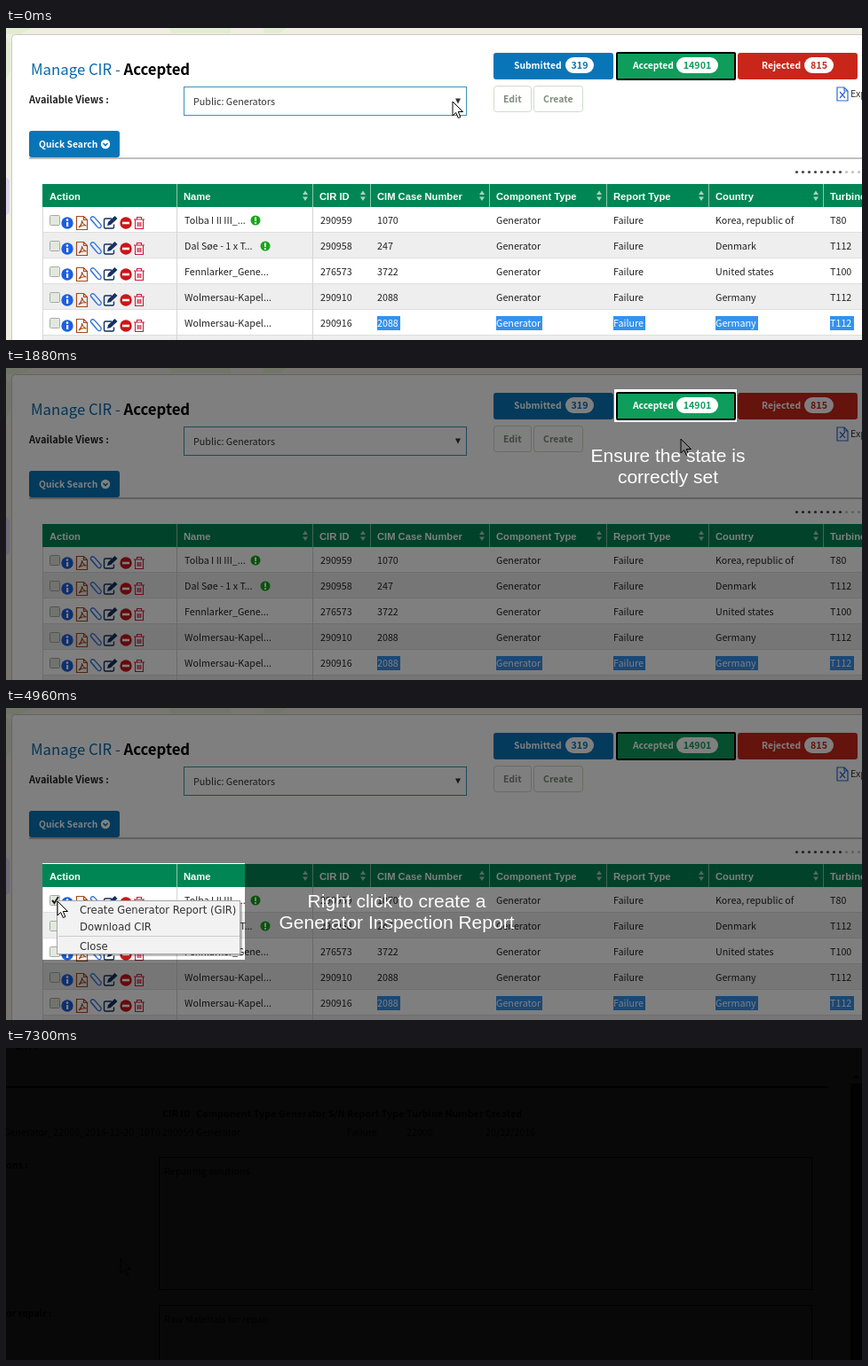
An HTML page that plays this animation: 964x352 px, repeating every 7330 ms.

```html
<!DOCTYPE html>
<html lang="en">
<head>
<meta charset="utf-8">
<title>Report list walkthrough</title>
<style>
html, body { margin: 0; width: 100%; height: 100%; overflow: hidden; background: #000; }
svg { display: block; width: 100vw; height: 100vh; }
text { white-space: pre; font: 10.74px 'Noto Sans CJK SC', 'Noto Sans CJK JP', 'Noto Sans CJK', 'Open Sans', sans-serif; }
.b { font-weight: bold; }
.head { font: bold 11.2px 'Liberation Sans', sans-serif; fill: #fff; }
.menu { font: 11.6px 'DejaVu Sans', sans-serif; fill: #333; }
.hint { font: 21px 'Liberation Sans', sans-serif; fill: #fff; text-anchor: middle; }
</style>
</head>
<body>
<svg id="stage" viewBox="0 0 964 352"></svg>
<script>
const LOOP = 7330, DIM = 0.5;

const rect = (x, y, w, h, fill, more = '') => `<rect x="${x}" y="${y}" width="${w}" height="${h}" fill="${fill}" ${more}/>`;
const text = (x, y, s, more = '') => `<text x="${x}" y="${y}" ${more}>${s}</text>`;
const line = (d, color, w = 1, more = '') => `<path d="${d}" fill="none" stroke="${color}" stroke-width="${w}" ${more}/>`;
const shape = (d, fill, more = '') => `<path d="${d}" fill="${fill}" ${more}/>`;
const disc = (x, y, r, fill) => `<circle cx="${x}" cy="${y}" r="${r}" fill="${fill}"/>`;
const group = (id, body, more = '') => `<g id="${id}" ${more}>${body}</g>`;

function stateButton(x, label, labelX, count, pillX, pillW, color) {
  const on = label === 'Accepted';
  const box = on
    ? rect(x + 1, 28, 133, 30, color, 'stroke="#000" stroke-width="2" rx="1"')
    : rect(x, 28, 135, 30, color, 'rx="3"');
  return box + text(labelX, 46, label, 'class="b" fill="#fff" style="font-size:10.3px"') +
    rect(pillX, 33, pillW, 18, '#fff', 'rx="9"') +
    text(pillX + pillW / 2, 46, count, `class="b" fill="${color}" text-anchor="middle"`);
}

function smallButton(x, w, label) {
  return rect(x + .5, 65.5, w, 29, '#fff', 'rx="3" stroke="#cfdccb"') +
    text(x + 11, 84, label, 'class="b" fill="#7f8c7c" style="font-size:10.5px"');
}

function docIcon(x, y, color, mark) {
  return line(`M${x} ${y}h8l4 4v11h-12zM${x + 8} ${y}v4h4`, color, 1.2) + line(mark, color, 1.2);
}

function rowIcons(y) {
  return rect(49.5, y - 8.5, 11, 11, '#e3e8df', 'stroke="#a3ada0" rx="1"') +
    disc(69, y, 6.7, '#1c5fe0') + rect(68, y - 1, 2.2, 5, '#fff') + disc(69, y - 3.4, 1.3, '#fff') +
    docIcon(79.5, y - 7.5, '#a8481c', `M82 ${y + 5}q4-4 3.5-8q1 5 5 6q-5-1-8.500 2`) +
    line(`M96 ${y - 4}l7 8.500q2 2 3.500 .5t0-3.500l-7-8q-2-1.500-3.500 0t0 3l6 7`, '#3c78dc', 1.3) +
    line(`M119 ${y - 5}h-7q-1.500 0-1.500 1.500v8q0 1.500 1.500 1.500h8q1.500 0 1.500-1.500v-3`, '#15315f', 1.4) +
    shape(`M114 ${y + 3}l1-4l7.500-7l3 3l-7.500 7z`, '#15315f') +
    disc(135, y, 6.7, '#cc1518') + rect(131, y - 1.3, 8, 2.6, '#fff') +
    line(`M144 ${y - 4}h12M147.500 ${y - 4}v-2.500h5v2.500M145.500 ${y - 4}v10.500h9v-10.500M148.200 ${y - 1}v5M150 ${y - 1}v5M151.800 ${y - 1}v5`, '#cf1c3c', 1.1);
}

const alertMark = (x, y) => disc(x, y, 5.5, '#16a81a') + rect(x - 1, y - 3.5, 2, 4.5, '#fff') + rect(x - 1, y + 2, 2, 2, '#fff');

const columns = [['Action', 49], ['Name', 200], ['CIR ID', 353], ['CIM Case Number', 418],
  ['Component Type', 552], ['Report Type', 684], ['Country', 799], ['Turbine Type', 928]];
const rows = [
  ['Tolba I II III_...', '290959', '1070', 'Korea, republic of', 'T80'],
  ['Dal Søe - 1 x T...', '290958', '247', 'Denmark', 'T112'],
  ['Fennlarker_Gene...', '276573', '3722', 'United states', 'T100'],
  ['Wolmersau-Kapel...', '290910', '2088', 'Germany', 'T112'],
  ['Wolmersau-Kapel...', '290916', '2088', 'Germany', 'T112']];
const selection = [[418, 26], [552, 52], [684, 36], [799, 48], [928, 27]];

function table() {
  let s = rect(41, 176, 923, 26, '#008654');
  columns.forEach(([name, x]) => s += text(x, 194, name, 'class="head"'));
  [337, 402, 536, 668, 783, 912].forEach(x =>
    s += shape(`M${x - 3} 188l3-4.500l3 4.500zM${x - 3} 190.500l3 4.500l3-4.500z`, '#a9d3bd'));
  for (let i = 0; i < 6; i++) {
    const y = 202 + i * 29;
    s += rect(41, y, 923, 29, i % 2 ? '#eeeeee' : '#fff') + rect(41, y + 28, 923, 1, '#dedede');
  }
  s += line('M41.500 202V352', '#d8d8d8');
  [193, 346, 411, 545, 677, 792, 921].forEach(x =>
    s += rect(x - 1, 176, 1, 26, '#8cc7ab') + (x < 400 ? rect(x - 1, 202, 1, 150, '#d4d4d4') : ''));
  selection.forEach(([x, w]) => s += rect(x, 325, w, 16, '#3492ee'));
  rows.forEach(([name, id, num, country, turbine], i) => {
    const y = 221 + i * 29, cells = [num, 'Generator', 'Failure', country, turbine];
    s += rowIcons(y - 1) + text(201, y, name, 'fill="#222"') + text(354, y, id, 'fill="#222"');
    cells.forEach((c, k) => s += text(selection[k][0], y, c, `fill="${i === 4 ? '#fff' : '#222'}"`));
  });
  return s + alertMark(281, 217) + alertMark(292, 246);
}

function listPage() {
  let s = rect(0, 0, 964, 352, '#f0eee2') +
    shape('M0 0h30l-14 7h-16zM183 0h70v6h-66zM290 0h26l-8 6h-18z', '#e2ecd2') +
    shape('M0 168l4 4v36l-4 4z', '#dcd4ee') + shape('M0 10l5 8v30l-5 10z', '#e2ecd2') +
    rect(6.5, 7.5, 970, 360, '#fff', 'stroke="#cbc9c2" rx="4"');
  s += text(28, 53, 'Manage CIR - <tspan class="b" fill="#000">Accepted</tspan>', 'fill="#0868ab" style="font-size:16.75px"') +
    text(26, 85, 'Available Views :', 'class="b" fill="#222" style="font-size:11px"') +
    rect(200.5, 66.500, 318, 32, '#fff', 'stroke="#3e93b4"') + text(211, 87, 'Public: Generators', 'fill="#333"') +
    shape('M506 79.500h6l-3 6z', '#333');
  s += stateButton(549, 'Submitted', 572, '319', 630, 32, '#0875b8') +
    stateButton(687, 'Accepted', 706, '14901', 755, 47, '#0f9d5c') +
    stateButton(824, 'Rejected', 851, '815', 899, 33, '#c9261a');
  s += smallButton(549, 42, 'Edit') + smallButton(594, 55, 'Create') +
    docIcon(936, 67, '#2c68d8', 'M939 72l6 7M945 72l-6 7') + text(951, 78, 'Export', 'fill="#333"');
  s += rect(26, 146, 938, 2, '#bfbfbf') + rect(26, 116, 102, 30, '#0875b8', 'rx="3"') +
    text(37, 135, 'Quick Search', 'class="b" fill="#fff" style="font-size:10.3px"') + disc(112, 131, 5.2, '#fff') +
    line('M109.500 130l2.500 2.500l2.500-2.500', '#0875b8', 1.6);
  for (let i = 0; i < 11; i++) s += disc(890.5 + i * 7, 162.5, 1.6, i < 8 ? '#444' : '#c4c4c4');
  return s + table();
}

function menu() {
  return rect(60, 220, 206, 60, '#000', 'opacity=".25"') +
    rect(57.5, 217.5, 206, 60, '#f2f2f2', 'stroke="#a5a5a5"') +
    rect(59, 218, 204, 19, '#3d93e2', 'id="hover"') + rect(59, 257, 204, 1, '#cccccc') +
    text(83, 232, 'Create Generator Report (GIR)', 'class="menu"') +
    text(83, 251, 'Download CIR', 'class="menu"') + text(83, 273, 'Close', 'class="menu"');
}

const arrow = shape('M0 0V16L3.700 12.500L6.300 18.500L8.800 17.500L6.300 11.500H11.500Z', '#fff', 'stroke="#000"');
const hand = shape('M3 1.500q0-1.500 1.500-1.500t1.500 1.500v6q2-1 3 .5q2-.8 3 .7q3-.7 3 2.300v5q0 3-2 5v2h-8v-2l-5-7q-1-2 .5-2.500t2.500 2z', '#fff', 'stroke="#000"') +
  line('M6 8v5M9 8.500v4.500M12 9.500v3.500', '#000', .8);

function reportPage() {
  const bold = (x, s, y = 78) => text(x, y, s, 'class="b"');
  const area = (y, s) => rect(172.5, y + .5, 735, 149, '#fff', 'stroke="#000"') + text(178, y + 20, s);
  return rect(0, 0, 964, 352, '#fff') + bold(10, 'S/N :', 2) + rect(0, 43, 926, 2, '#000') +
    rect(951, 40, 13, 312, '#555') + shape('M954 34l3.500-4l3.500 4z', '#444') +
    bold(176, 'CIR ID') + bold(214, 'Component Type') + bold(307, 'Generator S/N') +
    bold(384, 'Report Type') + bold(451, 'Turbine Number') + bold(540, 'Created') +
    text(174, 99, 'Generator_22000_2016-12-20_1070', 'text-anchor="end"') + text(176, 99, '290959') +
    text(214, 99, 'Generator') + text(384, 99, 'Failure') + text(451, 99, '22000') + text(540, 99, '20/12/2016') +
    bold(0, 'ons :', 136) + bold(0, 'or repair :', 303) +
    area(123, 'Repairing solutions') + area(290, 'Raw Materials for repair') +
    `<g transform="translate(129 238)">${arrow}</g>`;
}

const spot = (id, x, y, w, h) =>
  shape(`M0 0H964V352H0ZM${x} ${y}h${w}v${h}h${-w}z`, '#000', `id="${id}" fill-rule="evenodd"`);
const hint = (id, x, y, a, b) =>
  group(id, text(x, y, a, 'class="hint"') + text(x, y + 24, b, 'class="hint"'));

document.getElementById('stage').innerHTML = rect(0, 0, 964, 352, '#000') +
  group('list', listPage() + line('M52 217l2.500 3l4.500-7', '#222', 2, 'id="tick"') + group('menu', menu()) +
    group('cursor', group('arrow', arrow) + group('hand', hand)) +
    spot('spot1', 198, 64, 325, 38) + spot('spot2', 685, 24, 138, 37) + spot('spot3', 41, 175, 228, 109) +
    hint('hint1', 358.5, 135, 'Ensure the right view is', 'selected') +
    hint('hint2', 745.5, 106, 'Ensure the state is', 'correctly set') +
    hint('hint3', 440, 225, 'Right click to create a', 'Generator Inspection Report')) +
  group('report', reportPage());

const el = id => document.getElementById(id);
const fade = (id, a) => el(id).setAttribute('opacity', a);
const show = (id, on) => el(id).setAttribute('display', on ? 'inline' : 'none');
const ramp = (t, a, b) => Math.min(1, Math.max(0, (t - a) / (b - a)));
const smooth = p => p * p * (3 - 2 * p);

// start, end, x, y of each pointer move
const moves = [[30, 300, 195, 99], [1070, 1250, 760, 80], [2590, 2740, 670, 150],
  [2740, 3310, 58, 218], [5190, 5430, 113, 234]];

function pointer(t) {
  let x = 503, y = 83;
  for (const [a, b, tx, ty] of moves) {
    const p = smooth(ramp(t, a, b));
    x += (tx - x) * p;
    y += (ty - y) * p;
  }
  return `translate(${x} ${y})`;
}

function draw(t) {
  const in2 = 1 - (1 - ramp(t, 1070, 1790)) ** 2;
  const a1 = ramp(t, 30, 510) * (1 - ramp(t, 1070, 1790) ** 2);
  const a2 = in2 * (1 - ramp(t, 3340, 4030)) ** 2;
  const a3 = ramp(t, 3340, 3840);
  [a1, a2, a3].forEach((a, i) => fade('spot' + (i + 1), a * DIM));
  fade('hint1', a1);
  fade('hint2', a2);
  fade('hint3', ramp(t, 4480, 4960));
  show('tick', t >= 4130);
  show('menu', t >= 4480);
  show('hover', t >= 5190);
  show('arrow', t < 5190);
  show('hand', t >= 5190);
  el('cursor').setAttribute('transform', pointer(t));
  fade('list', 1 - ramp(t, 6430, 7150));
  fade('report', ramp(t, 7150, 8000) ** 2);
}

const start = performance.now();
function tick() {
  draw((performance.now() - start) % LOOP);
  requestAnimationFrame(tick);
}
draw(0);
requestAnimationFrame(tick);
</script>
</body>
</html>
```
